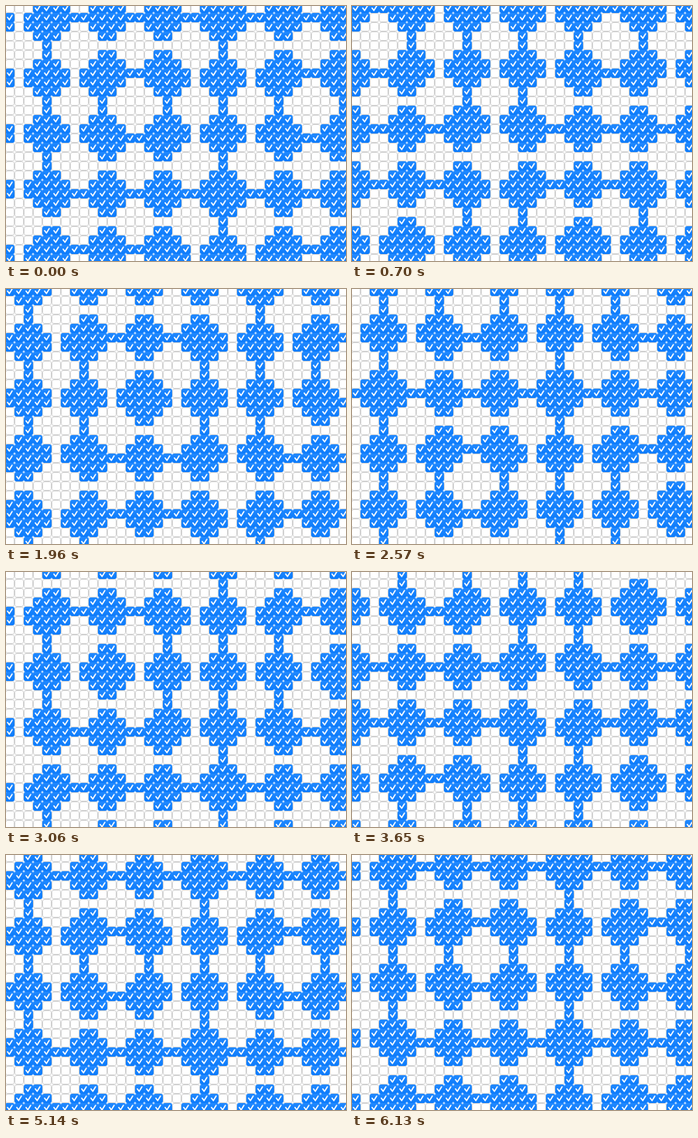
An HTML page with a canvas for the animation above (6.19 s loop, 440 by 330 pixels).

```html
<!DOCTYPE html>
<html lang="en">
<head>
<meta charset="utf-8">
<title>Checkbox waves</title>
<style>
  html, body { margin: 0; width: 100%; height: 100%; overflow: hidden; background: #fff; }
  canvas { display: block; }
</style>
</head>
<body>
<canvas id="stage" width="440" height="330"></canvas>
<script>
const ctx = document.getElementById('stage').getContext('2d');
const LOOP = 6190, TICKS = 62, TICK_MS = 98.6, LEAD_MS = 21.5;
const CELL = 12, LEFT = -1, TOP = -3, COLS = 37, ROWS = 28, RADIUS = 2.2;

function drawBox(x, y, checked) {
  ctx.beginPath();
  if (!checked) {
    ctx.roundRect(x + 0.5, y + 0.5, CELL - 1, CELL - 1, RADIUS);
    ctx.strokeStyle = '#d2d2d2';
    ctx.lineWidth = 1;
    ctx.stroke();
    return;
  }
  const blue = ctx.createLinearGradient(0, y, 0, y + CELL);
  blue.addColorStop(0, '#2189ff');
  blue.addColorStop(1, '#0c7bfb');
  ctx.roundRect(x, y, CELL, CELL, RADIUS);
  ctx.fillStyle = blue;
  ctx.fill();

  ctx.beginPath();
  ctx.moveTo(x + 3, y + 5.7);
  ctx.lineTo(x + 5.3, y + 8.8);
  ctx.lineTo(x + 8.9, y + 3);
  ctx.strokeStyle = '#fff';
  ctx.lineWidth = 1.6;
  ctx.lineCap = ctx.lineJoin = 'round';
  ctx.stroke();
}

// Two crossing cosine waves drift right and up; boxes on the positive side are checked.
function draw(tick) {
  const phase = tick / TICKS * 2 * Math.PI;
  const peakCol = 4.133 + 2 * phase;
  const peakRow = 1.067 - phase;
  ctx.fillStyle = '#fff';
  ctx.fillRect(0, 0, 440, 330);
  for (let row = 0; row < ROWS; row++) {
    for (let col = 0; col < COLS; col++) {
      const checked = Math.cos(col - peakCol) + Math.cos(row - peakRow) > 0;
      drawBox(LEFT + col * CELL, TOP + row * CELL, checked);
    }
  }
}

const origin = performance.now();
let shown = -1;

function frame() {
  const ms = (performance.now() - origin) % LOOP;
  const tick = Math.floor((ms + LEAD_MS) / TICK_MS);
  if (tick !== shown) draw(shown = tick);
  requestAnimationFrame(frame);
}
frame();
</script>
</body>
</html>
```
